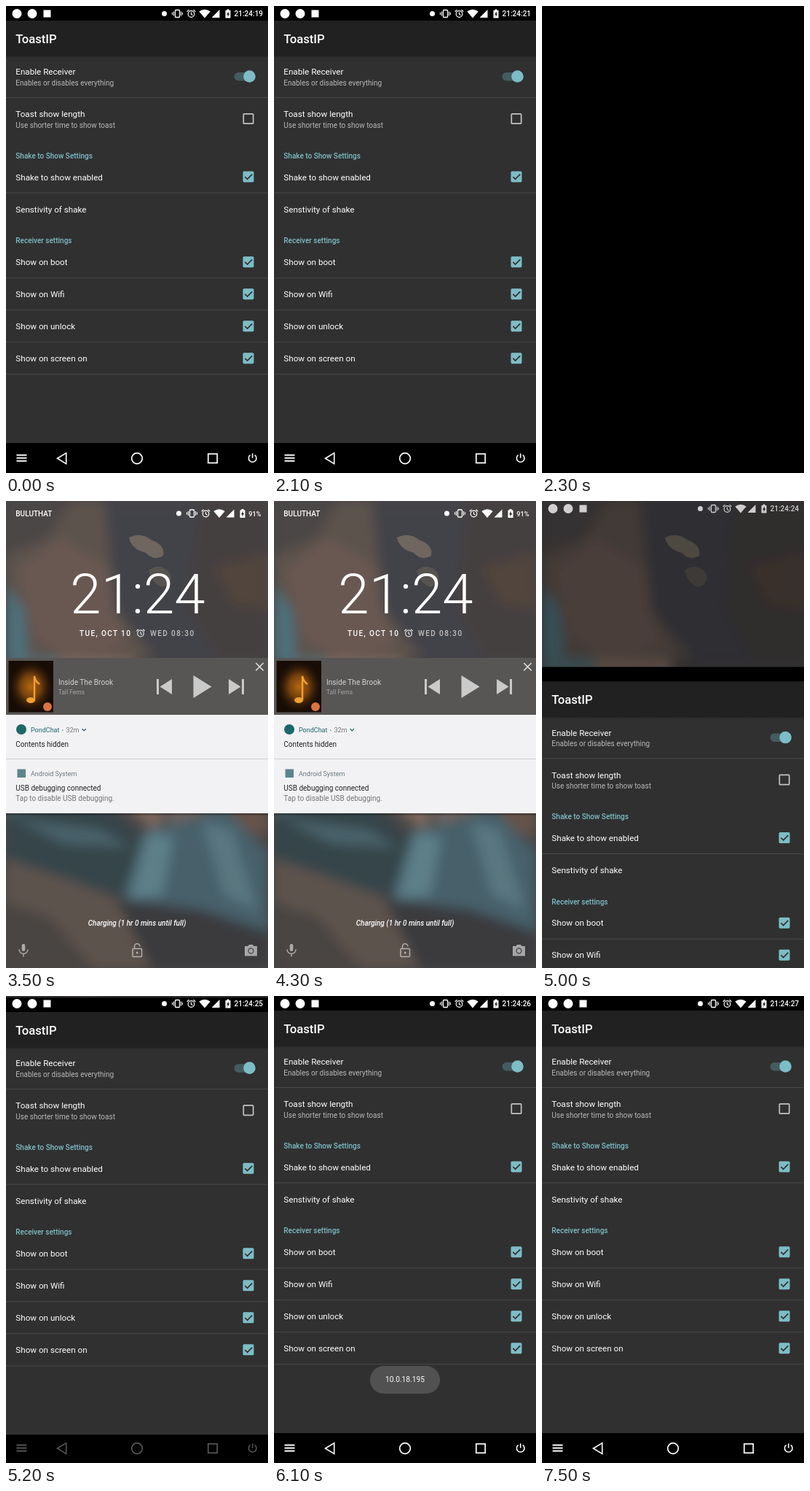
Recreate the animation shown at these times as an HTML page. Size 360 px wide and 640 px high, loop 8 s.

```html
<!DOCTYPE html>
<html lang="en">
<head>
<meta charset="utf-8">
<title>Settings and lock screen</title>
<style>
html, body { margin: 0; width: 100%; height: 100%; overflow: hidden; background: #000; }
svg { display: block; width: 100vw; height: 100vh; font-family: Roboto, "Open Sans", sans-serif; }
</style>
</head>
<body>
<svg id="stage" viewBox="0 0 360 640"></svg>
<script>
const TEAL = '#7dbdc6';

const text = (x, y, s, size = 10, fill = '#fff', extra = '') =>
  `<text x="${x}" y="${y}" font-size="${size}" fill="${fill}" ${extra}>${s}</text>`;
const rect = (x, y, w, h, fill, extra = '') =>
  `<rect x="${x}" y="${y}" width="${w}" height="${h}" fill="${fill}" ${extra}/>`;
const circle = (x, y, r, fill, extra = '') =>
  `<circle cx="${x}" cy="${y}" r="${r}" fill="${fill}" ${extra}/>`;
const shape = (d, fill, extra = '') => `<path d="${d}" fill="${fill}" ${extra}/>`;
const line = (d, stroke = '#fff', w = 1.6, extra = '') =>
  `<path d="${d}" fill="none" stroke="${stroke}" stroke-width="${w}" ${extra}/>`;
const group = (id, body, extra = '') => `<g id="${id}" ${extra}>${body}</g>`;
const at = (x, y, body) => `<g transform="translate(${x} ${y})">${body}</g>`;
const medium = 'font-weight="500"';

// icons, each around its own centre
const alarm = (c = '#fff') => circle(0, .5, 4.3, 'none', `stroke="${c}" stroke-width="1.2"`) +
  line('M0-2V.8L2 2.2M-5.8-2.8-3-5.2M5.8-2.8 3-5.2', c, 1.2);
const vibrate = rect(-3, -5, 6, 10, 'none', 'rx="1" stroke="#fff" stroke-width="1.3"') +
  line('M-5-3V3M5-3V3M-7-1.8V1.8M7-1.8V1.8', '#fff', 1.1);
const statusIcons = circle(217.5, 10.5, 3.5, '#fff') + at(235.5, 10.5, vibrate) + at(254.5, 10.5, alarm()) +
  shape('M265.3 7.6Q273 1.8 280.7 7.6L273 16.5Z', '#fff') +
  shape('M283 16V15.5L293.5 5V16Z', '#fff') +
  shape('M301.5 6H303.5V4.5H306.5V6H308.5V16.5H301.5Z', '#fff') +
  shape('M305.8 7.5 303 11.8H304.6V15L307.2 10.6H305.8Z', '#222');

function wallpaper() {
  const land = [
    ['M0 0H150L165 150 215 215H0Z', '#5d524d'],
    ['M0 0H90L60 50 0 75Z', '#4b4746'],
    ['M15 95 75 50 140 90 165 200 90 215 40 190Z', '#695951'],
    ['M135 0H270L255 90 290 215H205L150 150Z', '#434348'],
    ['M265 0H360V215H290L250 150Z', '#454141'],
    ['M285 90 360 70V150L310 140Z', '#51443e'],
    ['M0 115 25 150 30 215 0 225Z', '#4d717b'],
    ['M0 215H90L140 380 60 440 0 430Z', '#516a70'],
    ['M0 345 60 320 85 385 35 420 0 410Z', '#6b5549'],
    ['M70 215H190L210 330 215 460 165 420 110 350Z', '#7d685d'],
    ['M60 285 95 315 150 400 125 420 80 360Z', '#5f7e85'],
    ['M175 215H360V440L290 400 240 450 205 330Z', '#454344'],
    ['M195 340 250 350 290 420 225 450Z', '#6b625e'],
    ['M300 400 360 360V460L320 450Z', '#665349'],
    ['M0 430 110 400 185 460 165 540 60 520 0 500Z', '#364449'],
    ['M10 435 130 450 170 475 80 470Z', '#4a626a'],
    ['M190 450 250 440 300 420 360 480V600L270 560 160 545Z', '#47606a'],
    ['M195 455 230 460 215 540 170 545Z', '#5d7f88'],
    ['M270 440 310 450 345 560 300 540Z', '#5a7780'],
    ['M0 490 90 520 190 560 230 640H0Z', '#5d534e'],
    ['M0 550 60 570 120 640H0Z', '#494442'],
    ['M150 545 270 560 360 590V640H200Z', '#3b3a3c']
  ];
  return rect(0, 0, 360, 640, '#474546') +
    `<g filter="url(#soft)">${land.map(([d, c]) => shape(d, c)).join('')}</g>` +
    shape('M169 50Q185 42 199 53 219 60 216 75 203 83 192 71 172 66 169 50Z', '#6f675f') +
    shape('M196 95Q209 85 222 95 234 110 216 118 201 115 196 95Z', '#57534f');
}

const check = y => rect(325.5, y - 7.5, 15, 15, TEAL, 'rx="1.7"') +
  line(`M328.4 ${y + .2}l3.2 3.2 6.6-6.7`, '#303030', 1.7);
const row = (y, s) => text(13.3, y + 4.2, s, 11.67);
const note = (y, s) => text(13.3, y + 3.5, s, 10, '#b8b8b8');
const header = (y, s) => text(13.3, y + 3.5, s, 10, TEAL, medium);
const divider = y => rect(0, y - .5, 360, 1, '#494949');

const settings = rect(0, 0, 360, 640, '#303030') + rect(0, 0, 360, 20, '#000') +
  rect(0, 67, 360, 4, 'url(#shade)') + rect(0, 20, 360, 48, '#212121') +
  text(13.3, 50.5, 'ToastIP', 16.67, '#fff', medium) +
  row(90, 'Enable Receiver') + note(105, 'Enables or disables everything') +
  rect(313.5, 91, 27, 11.5, '#445b60', 'rx="5.75"') + circle(334.5, 96.5, 8.3, TEAL) +
  row(148, 'Toast show length') + note(163, 'Use shorter time to show toast') +
  rect(326.3, 147.8, 13.4, 13.4, 'none', 'rx="1" stroke="#c3c3c3" stroke-width="1.7"') +
  header(205, 'Shake to Show Settings') + row(234.3, 'Shake to show enabled') +
  row(278.5, 'Senstivity of shake') + header(321.5, 'Receiver settings') +
  ['boot', 'Wifi', 'unlock', 'screen on'].map((s, i) => {
    const y = 350.7 + 44 * i;
    return row(y, 'Show on ' + s) + check(y) + divider(y + 22);
  }).join('') +
  check(234) + divider(125.5) + divider(256) + rect(0, 599, 360, 41, '#000');

const nav = line('M14.5 615.5H28.5M14.5 619.5H28.5M14.5 623.5H28.5', '#fff', 1.8) +
  line('M70.5 620 82.7 612.6V627.4Z', '#fff', 1.6) +
  circle(180, 620, 7.3, 'none', 'stroke="#fff" stroke-width="1.7"') +
  rect(277.8, 613.8, 12.4, 12.4, 'none', 'stroke="#fff" stroke-width="1.7"') +
  line('M335.7 615.3A5.3 5.3 0 1 0 341.7 615.3M338.7 613.2V619.6', '#fff', 1.6);

const cover = rect(3.5, 219, 61.5, 70.5, '#170d06') + rect(3.5, 219, 61.5, 70.5, 'url(#glow)') +
  line('M39 273V240Q40 247 46 251', '#f0a030', 2.5) +
  `<ellipse cx="34" cy="273" rx="6" ry="4" fill="#f0a030"/>` + circle(57, 282, 6, '#dc7440');

const media = rect(0, 215, 360, 78, '#585655') + cover +
  text(72, 251.5, 'Inside The Brook', 10.1, '#d0d0d0') + text(72, 265, 'Tall Ferns', 8.4, '#a6a5a5') +
  shape('M207 244H210V265H207ZM228 244V265L211.5 254.5ZM257.5 239 282.5 254.5 257.5 270ZM306 244V265L322.5 254.5ZM324 244H327V265H324Z', '#cacaca') +
  line('M343.3 222 353.7 232.4M353.7 222 343.3 232.4', '#dedede', 1.5);

const chatCard = rect(0, 293, 360, 60, '#f2f1f4') + rect(0, 353, 360, 1, '#cfced1') +
  circle(21, 313, 7, '#1d6768') + text(34, 317, 'PondChat', 9, '#1d6768') +
  text(76.5, 317, '•', 8, '#777') + text(82.5, 317, '32m', 9, '#757575') +
  line('M104.6 312.3l2.6 2.6 2.6-2.6', '#1d6768', 1.3) + text(13.3, 337, 'Contents hidden', 10, '#222');

const systemCard = rect(0, 428, 360, 4, 'url(#shade)') + rect(0, 354, 360, 74, '#f2f1f4') +
  rect(15.5, 367.5, 11.5, 11.5, '#5d858c') + text(34, 377, 'Android System', 9, '#6b7a7e') +
  text(13.3, 396.7, 'USB debugging connected', 10, '#222') +
  text(13.3, 411, 'Tap to disable USB debugging.', 10, '#757575');

const corners = rect(21.7, 607, 4.6, 10, '#fff', 'rx="2.3"') +
  line('M18 614.5A6 6 0 0 0 30 614.5M24 620.5V624.5', '#fff', 1.5) +
  shape('M328 610H332.5L334 608H339L340.5 610H345V623.5H328Z', '#fff') +
  circle(336.5, 616.5, 4.2, '#666') + circle(336.5, 616.5, 2.7, '#fff');

const padlock = rect(174, 613.5, 12.5, 11, 'none', 'rx="1" stroke="#fff" stroke-width="1.5"') +
  line('M176.5 613.5V610.5A3.7 3.7 0 0 1 183.9 610.5', '#fff', 1.5) + circle(180.2, 619, 1.5, '#fff');

const lock =
  group('clock', text(181, 154, '21:24', 76.3, '#fff', 'font-weight="300" text-anchor="middle"')) +
  group('date', text(101, 185, 'TUE, OCT 10', 10, '#fff', medium + ' letter-spacing="1.4"') +
    at(185, 181, alarm('#e4e4e4')) +
    text(198, 185, 'WED 08:30', 10, '#c4c1bf', medium + ' letter-spacing="1.4"')) +
  group('system', systemCard) + group('chat', chatCard) + group('media', media) +
  text(13.3, 21, 'BULUTHAT', 10, '#fff', medium) + at(20, 6.5, statusIcons) +
  text(350.5, 20.5, '91%', 9.2, '#fff', medium + ' text-anchor="end"') +
  text(180, 581.5, 'Charging (1 hr 0 mins until full)', 10, '#fff', 'font-style="italic" font-weight="500" text-anchor="middle"') +
  group('corners', corners) + group('padlock', padlock, 'opacity=".55"') +
  group('touch', circle(0, 0, 9, '#c4c4c4', 'fill-opacity=".4"'));

const status = circle(15, 10.5, 6.5, '#fff') + circle(36, 10.5, 6.5, '#fff') + rect(51.5, 5.5, 10, 10, '#fff') +
  statusIcons + text(353, 14, '', 10, '#fff', medium + ' id="time" text-anchor="end"');

document.getElementById('stage').innerHTML = `<defs>
  <filter id="soft" x="0" y="0" width="1" height="1"><feGaussianBlur stdDeviation="8"/></filter>
  <linearGradient id="shade" x2="0" y2="1"><stop stop-opacity=".4"/><stop offset="1" stop-opacity="0"/></linearGradient>
  <radialGradient id="glow"><stop stop-color="#b5660f"/><stop offset=".45" stop-color="#74400d"/><stop offset="1" stop-color="#2a1607" stop-opacity="0"/></radialGradient>
</defs>` + wallpaper() + rect(0, 0, 360, 640, '#000', 'id="dim"') + group('lock', lock) +
  group('app', settings) + group('status', status) + group('nav', nav) +
  group('toast', rect(132, 507, 96, 38, '#515151', 'rx="19"') +
    text(180, 529.3, '10.0.18.195', 10.2, '#fff', 'text-anchor="middle"')) +
  rect(0, 0, 360, 640, '#000', 'id="off"');

const el = id => document.getElementById(id);
const ramp = (t, from, to) => Math.min(1, Math.max(0, (t - from) / (to - from)));
const fade = (id, v) => el(id).setAttribute('opacity', v);
const move = (id, y, x = 0, more = '') => el(id).setAttribute('transform', `translate(${x} ${y}) ${more}`);

function draw(t) {
  const swipe = t < 4400 ? 0 : (t - 4350) / 350;

  // screen switches off, then wakes on the lock screen
  fade('off', t < 3500 ? ramp(t, 2100, 2300) : 0);

  // swipe up
  fade('lock', t < 3500 ? 0 : 1 - ramp(t, 4700, 4900));
  const scale = 1 - .15 * swipe;
  move('clock', 127 - 5 * swipe, 181, `scale(${scale}) translate(-181 -127)`);
  fade('clock', Math.max(0, 1 - .45 * swipe));
  fade('date', Math.max(0, 1 - swipe));
  move('date', -20 * swipe);
  move('media', -56 * swipe);
  move('chat', -73 * swipe);
  move('system', -139 * swipe);
  fade('corners', Math.max(0, .55 - .4 * swipe));
  move('touch', 470 - 120 * swipe, 267);
  fade('touch', swipe > 0 ? 1 : 0);
  fade('dim', .3 * ramp(t, 4700, 5000));

  // app slides in from below
  const enter = ramp(t, 4850, 5221.5);
  move('app', t < 3500 ? 0 : 640 * (1 - enter) ** 2);
  fade('status', t < 3500 ? 1 : ramp(t, 4800, 5060));
  fade('nav', t < 3500 ? 1 : ramp(t, 5100, 5400));
  fade('toast', ramp(t, 5200, 5800) * (1 - ramp(t, 7000, 7500)));

  const ticks = Math.floor((t + 950) / 1000);
  el('time').textContent = '21:24:' + (19 + (t < 2400 ? Math.min(2, ticks) : ticks));
}

function loop() {
  draw(Math.floor(performance.now() % 8000 / 100) * 100);
  requestAnimationFrame(loop);
}
loop();
</script>
</body>
</html>
```
